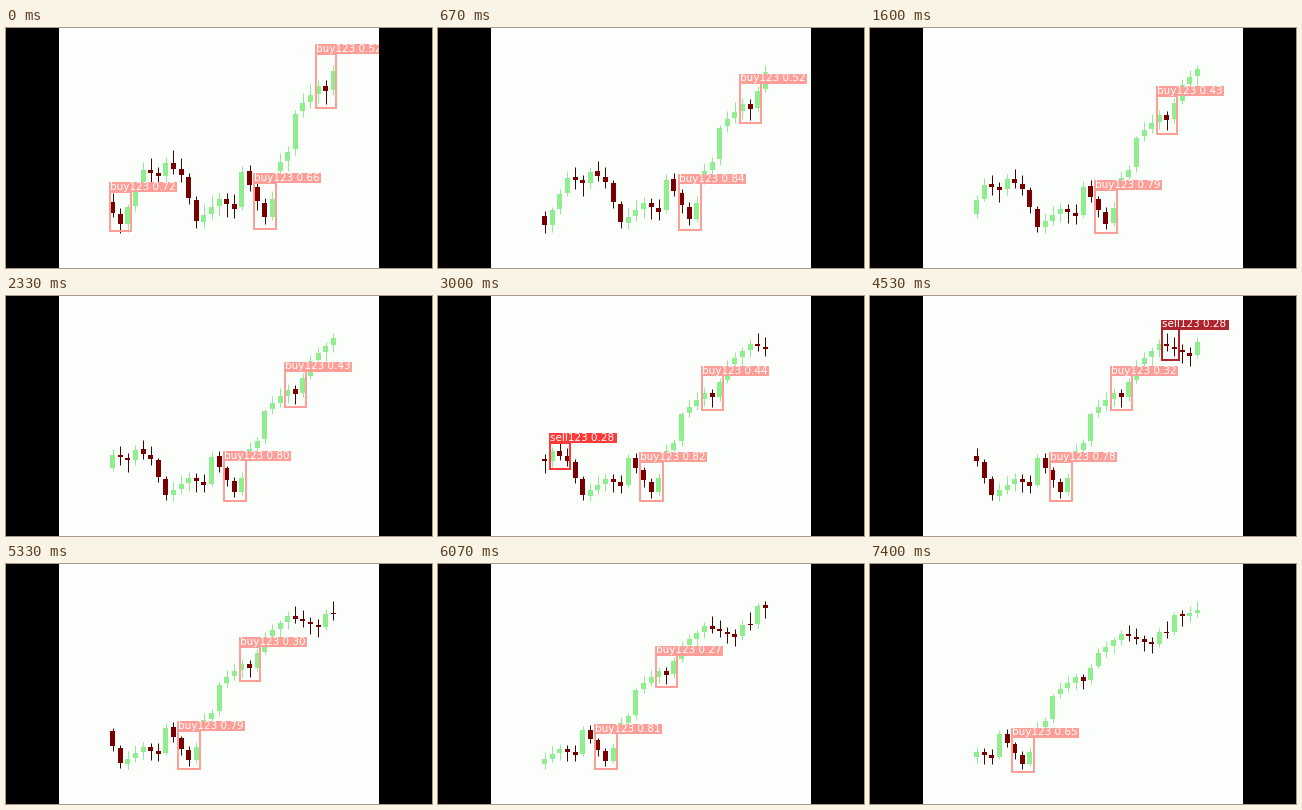
A matplotlib script for the animation above (7470 ms loop, 426x240 px).

```python
import numpy as np
import matplotlib.pyplot as plt
from matplotlib.animation import FuncAnimation
from matplotlib.patches import Rectangle

W, H, DPI = 426, 240, 96
PX = 72 / DPI
LEFT, RIGHT = 53, 373
FRAMES, LOOP_MS = 112, 7470
COUNT, SHOWN, X0, DX = 44, 30, 106.6, 7.61
TOP, BOTTOM = 37, 204.5

PAPER, UP, DOWN, DOWN_WICK = "#fcfefb", "#90ee90", "#780000", "#3c0808"
BUY, SELL, DEEP = "#ff9d97", "#ff3838", "#b0242e"

# Turning points of the price path: (candle, level), levels grow downwards
TURNS = [(0, 177), (2, 200), (5, 145), (7, 152), (8, 138), (10, 151), (12, 197),
         (15, 174), (17, 184), (18, 146), (21, 193), (22, 173), (22.04, 147),
         (24, 127), (25, 88), (28, 62), (29, 68), (31, 25), (34, -3), (38, 13),
         (39, -6), (40, -5), (41, -33), (42, -29), (44, -39)]

# Each candle follows the path; small bodies get long wicks, with a ripple
index = np.arange(COUNT)
opens = np.interp(index + 0.05, *zip(*TURNS))
closes = np.interp(index + 0.95, *zip(*TURNS))
falling = closes > opens
wick = 4.5 + 9 * np.exp(-abs(closes - opens) / 8)
ripple = 0.4 * np.cos(2 * np.pi * (index - 4) / 4.33)
highs = np.minimum(opens, closes) - wick * (1 + ripple)
lows = np.maximum(opens, closes) + wick * (1 - ripple)


def detections(step):
    """Yield (label, colour, first, last, top, bottom) in candle units."""
    if step == 0:
        yield "buy123 0.72", BUY, -0.4, 2.45, 167, 206
    if step == 6:
        yield "sell123 0.28", SELL, 6.7, 9.4, 127.5, 162
    if step == 9:
        yield "sell123 0.28", DEEP, 33.35, 35.55, -21.8, 19
    if step < 13:
        score = np.interp(step, [1, 3, 6, 9, 12], [0.52, 0.43, 0.44, 0.32, 0.27])
        top = np.interp(step, [0, 1], [31, 39])
        yield f"buy123 {score:.2f}", BUY, 26.7, 29.38, top, 84.5
    score = np.interp(step, [0, 1, 3, 6, 9, 12, 14],
                      [0.66, 0.84, 0.79, 0.82, 0.78, 0.81, 0.65])
    top = np.interp(step, [0, 1], [158, 152])
    yield f"buy123 {score:.2f}", BUY, 18.6, 21.5, top, 204


def draw_box(label, color, x0, x1, y0, y1):
    ax.add_patch(Rectangle((x0, y0), x1 - x0, y1 - y0, fill=False,
                           ec=color, lw=2 * PX, zorder=4))
    ax.add_patch(Rectangle((x0 - 1, y0 - 9.5), 68, 10, fc=color, lw=0, zorder=5))
    ax.text(x0, y0 - 1.7, label, color="white", fontsize=10.4 * PX,
            family="DejaVu Sans", va="baseline", clip_on=True, zorder=6)


def draw(n):
    step = (2 * n + 2) // 15
    view = slice(step, step + SHOWN)
    high, low = highs[view].min(), lows[view].max()

    def sx(i):
        return X0 + DX * (i - step)

    def sy(level):
        return TOP + (level - high) * (BOTTOM - TOP) / (low - high)

    ax.clear()
    ax.axis("off")
    ax.add_patch(Rectangle((LEFT, 0), RIGHT - LEFT, H, fc=PAPER, lw=0, zorder=0))

    x, down = sx(index[view]), falling[view]
    ax.vlines(x, sy(highs[view]), sy(lows[view]), lw=PX, zorder=2,
              colors=np.where(down, DOWN_WICK, UP))
    a, b = sy(opens[view]), sy(closes[view])
    mid, size = (a + b) / 2, np.maximum(abs(b - a), 1.2)
    ax.bar(x, size, 5, bottom=mid - size / 2, lw=0, zorder=3,
           color=np.where(down, DOWN, UP))
    ax.set(xlim=(LEFT, RIGHT), ylim=(H, 0))

    for label, color, i0, i1, top, bottom in detections(step):
        draw_box(label, color, sx(i0), sx(i1), sy(top), sy(bottom))


fig = plt.figure(figsize=(W / DPI, H / DPI), dpi=DPI, facecolor="black")
ax = fig.add_axes([LEFT / W, 0, (RIGHT - LEFT) / W, 1])
anim = FuncAnimation(fig, draw, frames=FRAMES, init_func=lambda: draw(0),
                     interval=LOOP_MS / FRAMES, repeat=True, repeat_delay=0)
plt.show()
```
